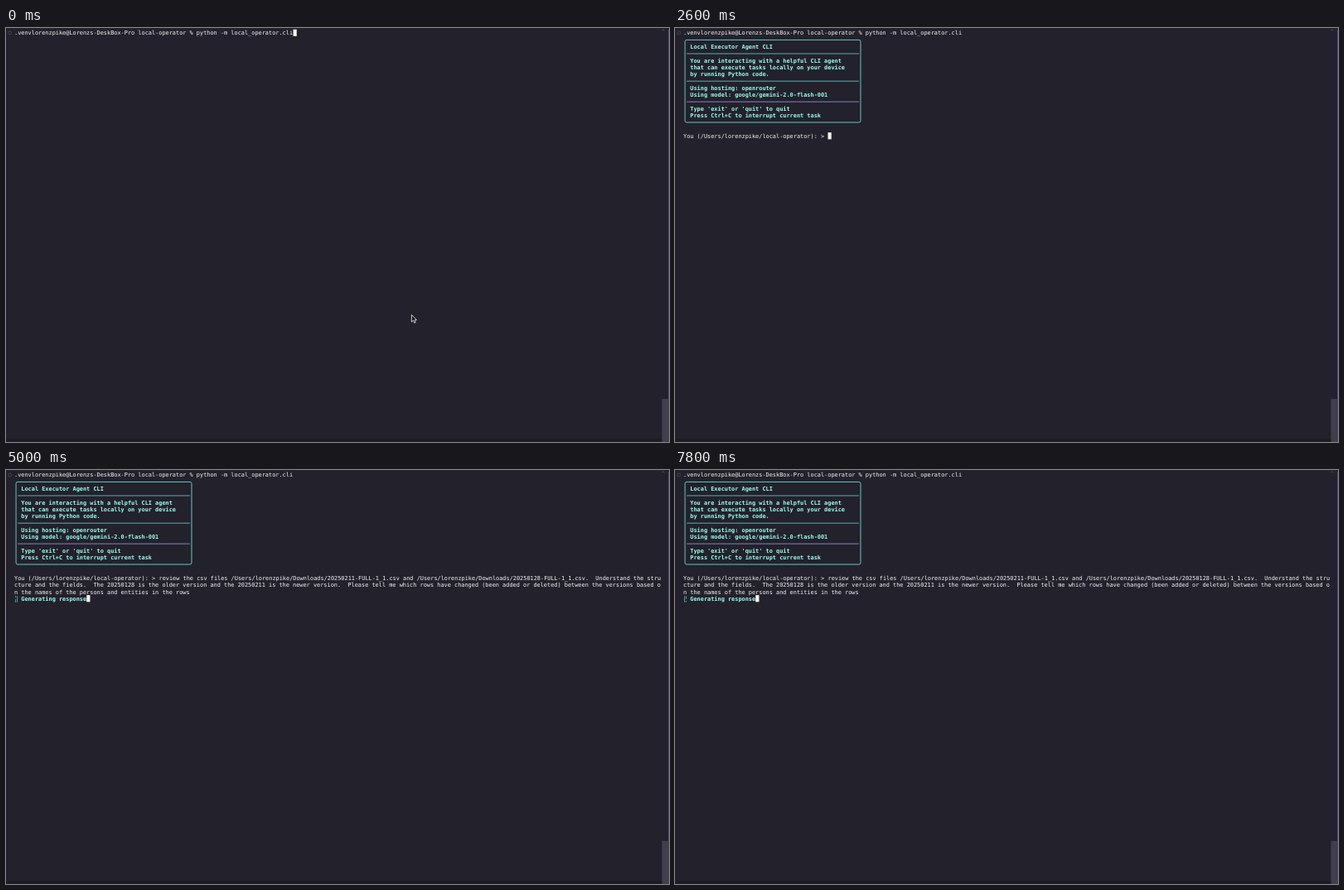
Write an HTML page that moves like this. It is 800 px wide and 500 px high and loops after 8 s.

```html
<!DOCTYPE html>
<html lang="en">
<head>
<meta charset="utf-8">
<title>Terminal session</title>
<style>
  html, body { margin: 0; width: 100%; height: 100%; overflow: hidden; background: #22212c; }
  svg { display: block; width: 800px; height: 500px; }
  text {
    font: 6.9px "DejaVu Sans Mono", monospace;
    text-rendering: geometricPrecision;
    white-space: pre;
    fill: #f8f8f2;
  }
  .bold { font-weight: bold; fill: #99ffee; }
  .spin { font-family: "DejaVu Sans Mono", "DejaVu Sans", monospace; fill: #80ffea; }
</style>
</head>
<body>
<svg id="stage" viewBox="0 0 800 500">
  <rect y="496" width="800" height="4" fill="#1d1c26"/>
  <circle cx="4.6" cy="6" r="2" fill="none" stroke="#4c4b57" stroke-width=".8"/>
  <path d="M791.5 3.2l1.5-1.5 1.5 1.5" fill="none" stroke="#5d5c68" stroke-width=".8"/>
  <rect x="799" y="2" width="1" height="446" fill="#483c70"/>
  <rect x="791.5" y="448" width="8.5" height="52" fill="#403f4b"/>
</svg>
<script>
const CELL = 4.155, ROW = 8.3, LEFT = 10, BASE = 8.4;
const LOOP = 8000, ENTER = 600, READY = 2200, PASTE = 3000, SEND = 3800;
const SPINNER = "⣾⣷⣯⣟⡿⢿⣻⣽";
const stage = document.getElementById("stage");

function add(parent, tag, attrs = {}) {
  const el = document.createElementNS("http://www.w3.org/2000/svg", tag);
  for (const key in attrs) el.setAttribute(key, attrs[key]);
  return parent.appendChild(el);
}

const colX = col => LEFT + col * CELL;
const midY = row => 6.1 + row * ROW;

function print(parent, col, row, string, cls = "") {
  const el = add(parent, "text", { x: colX(col), y: BASE + row * ROW, class: cls });
  el.textContent = string;
  return el;
}

const show = (el, on) => el.setAttribute("visibility", on ? "visible" : "hidden");

print(stage, 0, 0, ".venvlorenzpike@Lorenzs-DeskBox-Pro local-operator % python -m local_operator.cli");

// Welcome banner and input prompt
const banner = add(stage, "g");
add(banner, "rect", {
  x: colX(.5), y: midY(1), width: 51 * CELL, height: 12 * ROW, rx: 2,
  fill: "none", stroke: "#62c9be"
});
for (const [row, color] of [[3, "#68bdb9"], [7, "#68bdb9"], [10, "#8f8fce"]])
  add(banner, "path", { d: `M${colX(1)} ${midY(row)}H${colX(51)}`, stroke: color, "stroke-width": .9 });

[
  [2, "Local Executor Agent CLI"],
  [4, "You are interacting with a helpful CLI agent"],
  [5, "that can execute tasks locally on your device"],
  [6, "by running Python code."],
  [8, "Using hosting: openrouter"],
  [9, "Using model: google/gemini-2.0-flash-001"],
  [11, "Type 'exit' or 'quit' to quit"],
  [12, "Press Ctrl+C to interrupt current task"]
].forEach(([row, line]) => print(banner, 2, row, line, "bold"));
print(banner, 0, 15, "You (/Users/lorenzpike/local-operator): >");

// Pasted request
const request = add(stage, "g");
print(request, 42, 15, "review the csv files /Users/lorenzpike/Downloads/20250211-FULL-1_1.csv and /Users/lorenzpike/Downloads/20250128-FULL-1_1.csv.  Understand the stru");
print(request, 0, 16, "cture and the fields.  The 20250128 is the older version and the 20250211 is the newer version.  Please tell me which rows have changed (been added or deleted) between the versions based o");
print(request, 0, 17, "n the names of the persons and entities in the rows");

const status = add(stage, "g");
const spinner = print(status, 0, 18, "", "spin");
print(status, 2, 18, "Generating response", "bold");

const caret = add(stage, "rect", { width: 4.2, height: 8.2, fill: "#f8f8f2" });
const pointer = add(stage, "path", {
  d: "M489.4 346.4v8.6l2-1.8 1.4 3 1.4-.6-1.3-2.9h2.6z",
  fill: "#111", stroke: "#f4f4f4", "stroke-width": .8, "stroke-linejoin": "round"
});

// Caret column and row from each moment on
const caretStops = [[0, 81, 0], [ENTER, 0, 1], [READY, 42, 15], [PASTE, 51, 17], [SEND, 21, 18]];

function draw() {
  const t = performance.now() % LOOP;
  show(pointer, t < ENTER);
  show(banner, t >= READY);
  show(request, t >= PASTE);
  show(status, t >= SEND);
  const [, col, row] = caretStops.findLast(stop => t >= stop[0]);
  caret.setAttribute("x", colX(col));
  caret.setAttribute("y", midY(row) - 4.4);
  // The screen refreshes every 200 ms, the spinner turns every 100 ms
  spinner.textContent = SPINNER[(Math.floor(t / 200) * 2 + 5) % 8];
  requestAnimationFrame(draw);
}
draw();
</script>
</body>
</html>
```
